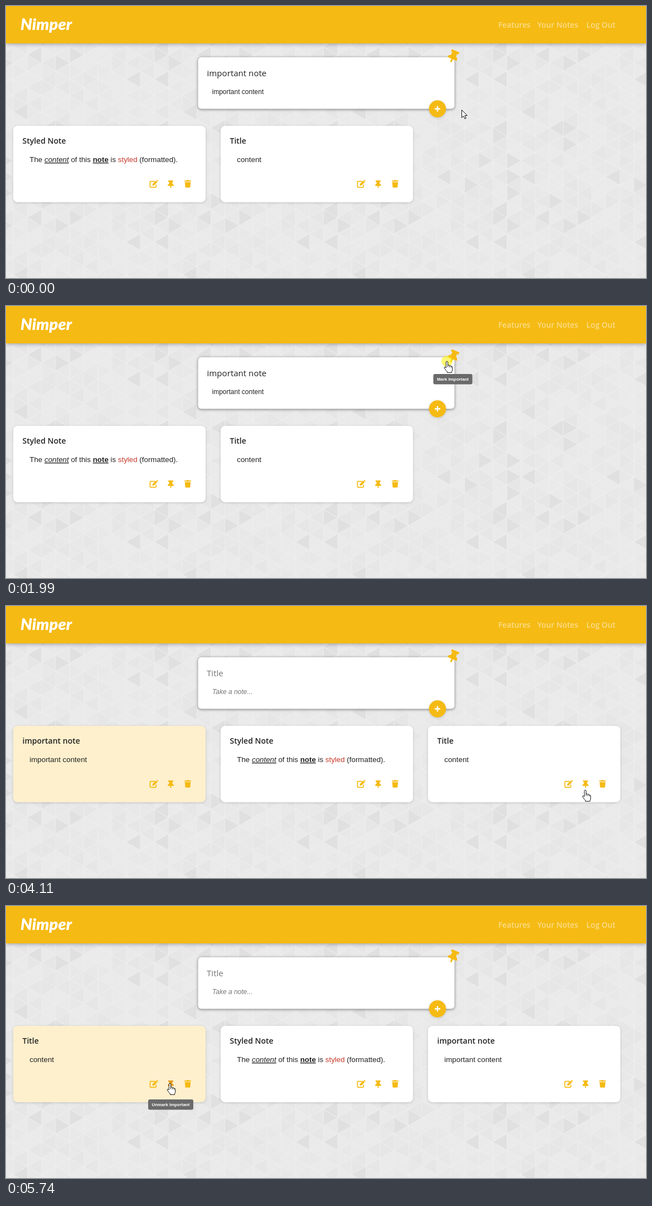
An HTML page that plays this animation: 1148x488 px, repeating every 6570 ms.

```html
<!DOCTYPE html>
<html lang="en">
<head>
<meta charset="utf-8">
<title>Notes</title>
<style>
html, body { margin: 0; width: 100%; height: 100%; overflow: hidden; background: #e9e9e9; }
svg { position: absolute; left: 0; top: 0; }
text { font-family: "Liberation Sans", Arial, sans-serif; fill: #222; white-space: pre; }
.ui { font-family: "Open Sans", "Noto Sans", sans-serif; }
.nav { font-size: 13.8px; font-weight: 600; fill: #fbdc89; }
.logo { font: italic 900 29px Lato, sans-serif; fill: #fff; }
.heading { font-size: 15.1px; }
.title { font-size: 14px; font-weight: 600; }
.body { font-size: 13.33px; }
.small { font-size: 12px; }
.hint { fill: #757575; }
.tip { font-size: 7.9px; font-weight: bold; fill: #fff; text-anchor: middle; }
.bar { filter: drop-shadow(0 2px 3px rgba(0,0,0,.28)); }
.form { filter: drop-shadow(0 1px 2.5px rgba(0,0,0,.5)); }
.card { filter: drop-shadow(0 1.5px 2px rgba(0,0,0,.16)); }
.snack { filter: drop-shadow(0 3px 4px rgba(0,0,0,.35)); }
</style>
</head>
<body>
<svg width="1148" height="488"><g id="back"></g></svg>
<svg width="1148" height="488"><g id="scene"></g></svg>
<script>
const LOOP = 6570, STEP = 76.2;
const GOLD = '#f5ba13', HOVER = '#e39a1c', CREAM = '#fef0cd';

const MARK = 'Mark Important', UNMARK = 'Unmark Important';
const NOTES = {
  styled: ['Styled Note', 'The <tspan font-style="italic" text-decoration="underline">content</tspan> of this ' +
    '<tspan font-weight="bold" text-decoration="underline">note</tspan> is <tspan fill="#c63a2b">styled</tspan> (formatted).'],
  plain: ['Title', 'content'],
  important: ['important note', 'important content']
};

// From each time on: the order of cards and how many of the first are marked
const BOARDS = [
  [0, 'styled plain', 0],
  [3600, 'important styled plain', 1],
  [4740, 'important plain styled', 2],
  [5740, 'plain styled important', 1]
];

// Pointer: time, x, y of the tip
const PATH = [
  [0, 817, 186], [300, 796, 95], [650, 796, 95], [960, 222, 441], [1300, 222, 441],
  [1880, 791, 99], [2400, 791, 99], [2820, 775, 166], [3040, 775, 180], [3420, 776, 179],
  [3600, 776, 179], [4035, 1039, 330], [4260, 1040, 322], [4830, 1040, 322], [5330, 294, 318]
];
const HANDS = [[290, 690], [920, 1370], [1830, 2480], [2820, 3680], [4030, 4900], [5250, LOOP]];
const CLICKS = [[1230, 1300], [1990, 2220], [3220, 3370], [4510, 4740], [5570, 5740]];

// Tooltips: start, end, centre x, top, width, text, fade-out time
const TIPS = [
  [230, 610, 801.5, 122, 70, MARK, 0], [610, 760, 801.5, 122, 81, UNMARK, 150],
  [1760, 2220, 801.5, 122, 70, MARK, 0], [2220, 2500, 801.5, 122, 81, UNMARK, 150],
  [2910, 3600, 774, 211, 28, 'Add', 150], [4270, 4740, 1039.5, 347, 70, MARK, 0],
  [5210, LOOP, 295.5, 347, 81, UNMARK, 0]
];
const SNACKS = [[610, 1300], [2220, 3600]];

const PIN = 'M1.5 0h8q.5 0 .5.5v1.5q0 .6-.6.6h-1.2l.3 3.3q2.4 1 2.5 3.2q0 .6-.6.6h-4v3l-.9 1.3l-.9-1.3v-3h-4' +
  'q-.6 0-.6-.6q.1-2.2 2.5-3.2l.3-3.3h-1.2q-.6 0-.6-.6v-1.5q0-.5.5-.5z';
const HAND = 'M-1.6 12V1.8Q-1.6.3 0 .3T1.6 1.8V7.5q.8-1 2.6-.2q.6.3.6 1q1.6-1.1 2.8.4q.1.4.1.8q1.9-.8 2 1.2v4.5' +
  'q0 2-1.2 3.6v1.6h-8.2v-1.6q-2-2-4-5q-2-2.4-.6-3.2q1.4-.5 2.6 1.4zM1.6 7v3.5M4.8 8.5v2.5M7.7 9.5v2';
const ARROW = 'M.5.5v13.8l3.2-3 2.2 5 2.3-1-2.2-4.8h4.3z';

const within = (t, list) => list.some(([a, b]) => t >= a && t < b);
const clamp = v => Math.max(0, Math.min(1, v));
const at = (x, y, s, more = '') => `<g transform="translate(${x} ${y}) ${more}">${s}</g>`;
const text = (x, y, cls, s) => `<text x="${x}" y="${y}" class="${cls}">${s}</text>`;
const rect = (x, y, w, h, r, fill, cls = '') =>
  `<rect x="${x}" y="${y}" width="${w}" height="${h}" rx="${r}" fill="${fill}" class="${cls}"/>`;
const path = (d, fill, more = '') => `<path d="${d}" fill="${fill}" ${more}/>`;

function backdrop() {
  const w = 25.3, s = 29.2, shades = ['', '', '', ''];
  const rand = n => { const v = Math.sin(n * 12.9898) * 43758.5453; return v - Math.floor(v); };
  for (let c = 0; c < 46; c++) for (let r = -1; r < 18; r++) for (let side = 0; side < 2; side++) {
    const odd = c % 2, x = 13 + (c - 1) * w, from = x + side * w, to = x + w - side * w;
    const y = (r + (side ? 1 - odd : odd) / 2) * s;
    const v = rand(1 + c % 12 + 12 * ((r + 10) % 10) + 120 * side);
    const shade = v > .92 ? 3 : v > .7 ? 2 : v > .4 ? 1 : 0;
    shades[shade] += `M${from} ${y}v${s}L${to} ${y + s / 2}z`;
  }
  const fills = ['#eaeaea', '#e8e8e8', '#e6e6e6', '#e0e0e0'];
  return shades.map((d, i) => path(d, fills[i], 'stroke="#efefef" stroke-width=".7"')).join('') +
    rect(0, 0, 1148, 67, 0, GOLD, 'bar') + text(26, 43, 'logo', 'Nimper') +
    text(883, 39, 'ui nav', 'Features') + text(953, 39, 'ui nav', 'Your Notes') + text(1041, 39, 'ui nav', 'Log Out');
}

const editIcon = path('M9.8 2.6H2.4Q.9 2.6.9 4.1v7.7q0 1.5 1.5 1.5h7.8q1.5 0 1.5-1.5V8.5', 'none',
  `stroke="${GOLD}" stroke-width="1.7"`) +
  path('M5 10.3l.4-3L11.4 1.4 14 4 8 9.9zM12 .8l.7-.6q.5-.4 1 0l1.5 1.5q.4.5 0 1l-.6.7z', GOLD);
const trashIcon = path('M0 1.3h3.6l.5-1h3.8l.5 1H12v1.8H0zM.8 4h10.4l-.7 8.6q-.1 1.2-1.3 1.2H2.8q-1.2 0-1.3-1.2z', GOLD);

function card([title, body], col, marked, hovered) {
  return at(13 + 372 * col, 215,
    rect(0, 0, 345, 137, 8, marked ? CREAM : '#fff', 'card') +
    text(16.5, 32, 'ui title', title) + text(29.3, 65, 'body', body) +
    at(244.5, 97, editIcon) + at(277, 98, path(PIN, hovered ? HOVER : GOLD)) + at(307, 97, trashIcon));
}

function form(t) {
  const filled = t < 3600, marked = within(t, SNACKS);
  const ripple = t >= 3370 && t < 3600;
  return rect(344.5, 92, 460, 92.5, 6, marked ? '#ffefcc' : '#fff', 'form') +
    (filled ? text(360.5, 126, 'ui heading', 'important note') + text(369.5, 158, 'small', 'important content')
      : text(360, 126, 'ui heading hint', 'Title') +
        `<text x="370" y="158" class="small hint" font-style="italic">Take a note...</text>`) +
    at(802, 91, path(PIN, GOLD, 'transform="translate(-9 -11.5) scale(1.64)"'), 'rotate(23)') +
    `<circle cx="774" cy="184.5" r="15.3" fill="${ripple ? '#f8c843' : GOLD}" class="card"/>` +
    path('M769 184.5h10M774 179.5v10', 'none', `stroke="#fff" stroke-width="2.4" opacity="${ripple ? .7 : 1}"`);
}

function snack(t) {
  return SNACKS.map(([a, b]) => {
    const k = Math.min(clamp((t - a) / 200), clamp((b + 200 - t) / 200));
    return k ? `<g opacity="${k}">` + rect(19.5, 431, 242.5, 40, 4, '#313131', 'snack') +
      '<text x="33" y="455" class="small" style="fill:#fff">Marked Important</text>' +
      '<text x="196" y="454.5" font-size="11.6" style="fill:#e0164f">UNDO</text>' +
      path('M243.3 446.5l9 9M252.3 446.5l-9 9', 'none', 'stroke="#fff" stroke-width="2.9"') + '</g>' : '';
  }).join('');
}

function tips(t) {
  return TIPS.map(([a, b, x, y, w, label, out]) => {
    if (t < a || t >= b + out) return '';
    const swapped = label === UNMARK && x > 800;
    const k = t < b ? (swapped ? 1 : clamp((t - a + 20) / 150)) : 1 - (t - b) / out;
    return `<g opacity="${k}">` + rect(x - w / 2, y, w, 18.5, 3, '#6a6a6a') + text(x, y + 12, 'tip', label) + '</g>';
  }).join('');
}

function place(t) {
  const i = PATH.findIndex(p => p[0] > t);
  if (i < 0) return PATH[PATH.length - 1].slice(1);
  const [t0, x0, y0] = PATH[i - 1], [t1, x1, y1] = PATH[i];
  const u = (t - t0) / (t1 - t0), k = u * u * (3 - 2 * u);
  return [x0 + (x1 - x0) * k, y0 + (y1 - y0) * k];
}

function pointer(t) {
  const [x, y] = place(Math.floor(t / STEP) * STEP);
  return (within(t, CLICKS) ? `<circle cx="${x}" cy="${y}" r="10" fill="#fff000" opacity=".55"/>` : '') +
    at(x, y, path(within(t, HANDS) ? HAND : ARROW, '#fff', 'stroke="#111" stroke-width="1" stroke-linejoin="round"'));
}

function draw(now) {
  const t = now % LOOP;
  const [, order, marked] = BOARDS.filter(b => b[0] <= t).pop();
  const hovered = t >= 4200 && t < 4900 ? 2 : t >= 5300 ? 0 : -1;
  scene.innerHTML = form(t) +
    order.split(' ').map((name, i) => card(NOTES[name], i, i < marked, i === hovered)).join('') +
    snack(t) + tips(t) + pointer(t);
  requestAnimationFrame(draw);
}

const scene = document.getElementById('scene');
document.getElementById('back').innerHTML = backdrop();
draw(0);
</script>
</body>
</html>
```
